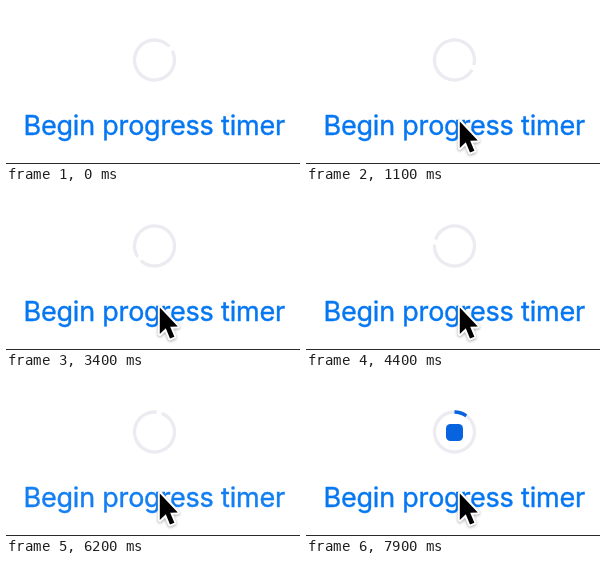
These frames come from a looping animation (294 px wide and 158 px high, 8000 ms). An HTML page with a canvas:

```html
<!DOCTYPE html>
<html lang="en">
<head>
<meta charset="utf-8">
<title>Progress timer</title>
<style>
  html, body { margin: 0; width: 100%; height: 100%; overflow: hidden; background: #fff; }
  canvas { display: block; width: 294px; height: 158px; }
</style>
</head>
<body>
<canvas id="stage"></canvas>
<script>
const W = 294, H = 158, LOOP = 8000, TICK = 100;
const CX = 148.5, CY = 54, R = 20, LINE = 3.3;
const BLUE = '#0577f2', DEEP = '#0763de', TRACK = '#ebebf1';
const LABEL = 'Begin progress timer';
const ARROW = [[0, 0], [0, 26.5], [6, 20.8], [10.2, 31], [14.6, 29.2], [10.4, 19.2], [18, 18.9]];

const canvas = document.getElementById('stage');
const dpr = window.devicePixelRatio || 1;
canvas.width = W * dpr;
canvas.height = H * dpr;
const ctx = canvas.getContext('2d');

const clamp = v => Math.min(1, Math.max(0, v));
const smooth = v => v * v * (3 - 2 * v);
const mix = (a, b, v) => a + (b - a) * v;

// Angles in degrees, clockwise from the top.
function arc(from, to, color) {
  const rad = a => (a - 90) * Math.PI / 180;
  ctx.beginPath();
  ctx.arc(CX, CY, R, rad(from), rad(to));
  ctx.strokeStyle = color;
  ctx.lineWidth = LINE;
  ctx.stroke();
}

// The spinner advances in 200 ms steps while the pointer rests.
function spinTime(t) {
  if (t < 1100 || t >= 5800) return t;
  const start = t < 2000 || t >= 5100 ? 1100 : 2000;
  return start + Math.floor((t - start) / 200) * 200;
}

function drawWaiting(t) {
  const gap = 15;
  const lead = 186 + (spinTime(t) - 2400) * 360 / 7000;
  arc(lead, lead + 360 - gap, TRACK);
}

function drawProgress(t) {
  arc(0, 360, TRACK);
  const ticks = Math.floor((t - 6900) / 500);
  if (ticks > 0) arc(0, ticks * 18, DEEP);
  ctx.globalAlpha = clamp((t - 7000) / 300);
  ctx.fillStyle = DEEP;
  ctx.beginPath();
  ctx.roundRect(CX - 8.5, CY - 8, 17, 17, 4.5);
  ctx.fill();
  ctx.globalAlpha = 1;
}

function drawLabel(t) {
  const press = clamp(1 - Math.abs(t - 6350) / 250);
  ctx.globalAlpha = 1 - 0.15 * press;
  ctx.font = '27px Inter, Roboto, sans-serif';
  ctx.letterSpacing = '-0.2px';
  ctx.textAlign = 'center';
  ctx.textBaseline = 'alphabetic';
  ctx.fillStyle = ctx.strokeStyle = BLUE;
  ctx.lineWidth = 0.4;
  ctx.lineJoin = 'round';
  ctx.fillText(LABEL, 148.2, 129);
  ctx.strokeText(LABEL, 148.2, 129);
  ctx.globalAlpha = 1;
}

function drawPointer(t) {
  const v = smooth(clamp((t - 300) / 600));
  ctx.save();
  ctx.translate(mix(191.5, 153.8, v), mix(172, 115.5, v));
  ctx.beginPath();
  ARROW.forEach(([x, y]) => ctx.lineTo(x, y));
  ctx.closePath();
  ctx.lineJoin = 'round';
  ctx.lineWidth = 4;
  ctx.strokeStyle = '#fff';
  ctx.shadowColor = 'rgba(0,0,0,.35)';
  ctx.shadowBlur = 3 * dpr;
  ctx.shadowOffsetY = dpr;
  ctx.stroke();
  ctx.shadowColor = 'transparent';
  ctx.fillStyle = '#000';
  ctx.fill();
  ctx.restore();
}

function draw(t) {
  ctx.setTransform(dpr, 0, 0, dpr, 0, 0);
  ctx.fillStyle = '#fff';
  ctx.fillRect(0, 0, W, H);
  (t < 7100 ? drawWaiting : drawProgress)(t);
  drawLabel(t);
  drawPointer(t);
  ctx.fillStyle = '#2a2a2a';
  ctx.fillRect(0, H - 1, W, 1);
}

const begin = performance.now();
function frame() {
  const t = (performance.now() - begin) % LOOP;
  draw(Math.floor(t / TICK) * TICK);
  requestAnimationFrame(frame);
}
frame();
</script>
</body>
</html>
```
